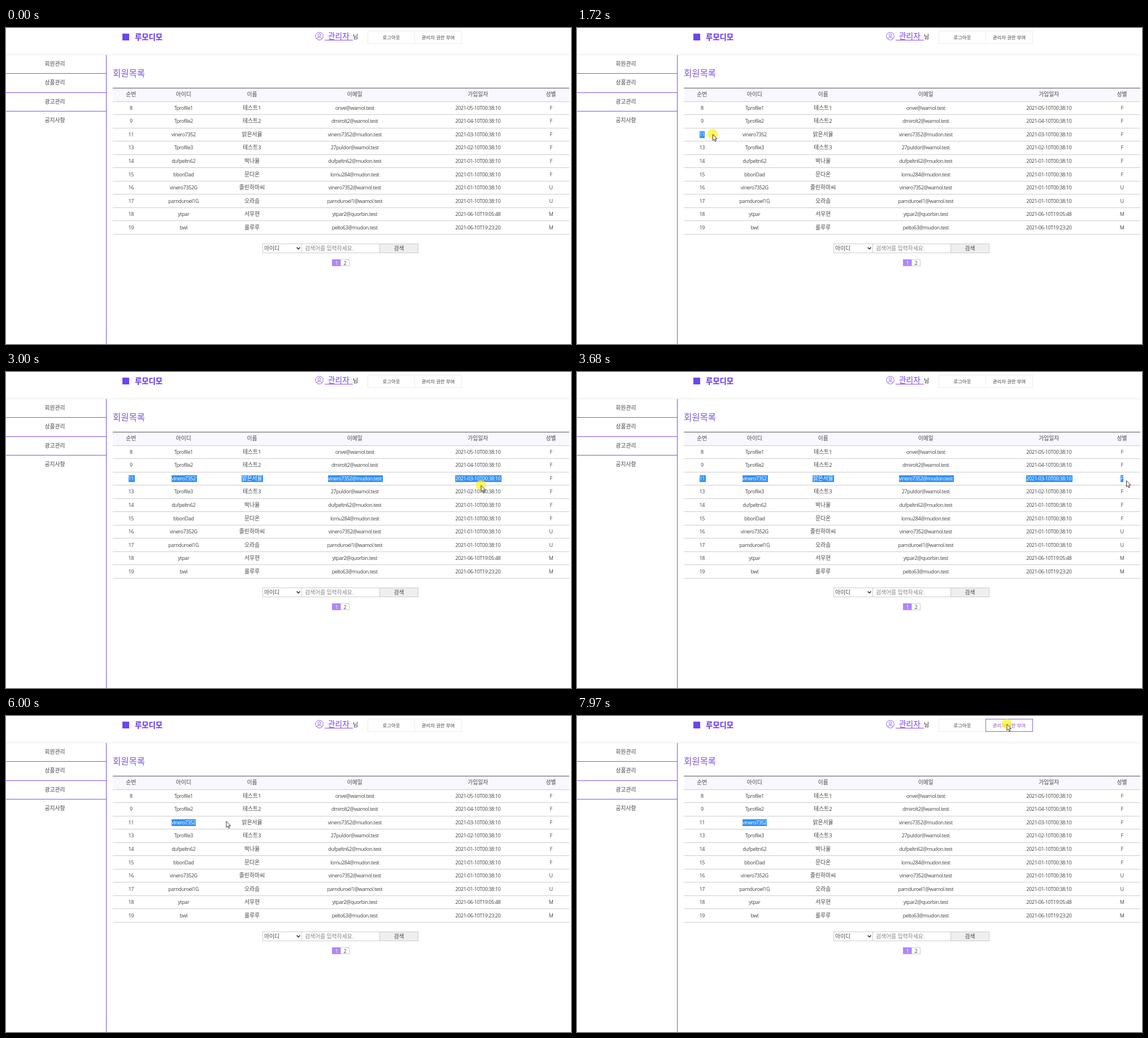
An HTML page for the animation above (8 s loop, 1000x560 px).

```html
<!DOCTYPE html>
<html lang="ko">
<head>
<meta charset="utf-8">
<title>회원목록</title>
<style>
html, body { margin: 0; width: 100%; height: 100%; overflow: hidden; background: #fff; }
body { position: relative; color: #444; font: 9.8px/12px "Open Sans", "Noto Sans CJK KR", sans-serif; white-space: nowrap; }
body > * { position: absolute; box-sizing: border-box; }

/* header */
.bar { left: 0; top: 47px; width: 997px; height: 1px; background: #e9e9e9; }
.mark { left: 206px; top: 10px; width: 12px; height: 12px; background: #6a45f2; }
.brand { left: 228px; top: 7px; font-size: 13.3px; line-height: 18px; font-weight: 700; color: #6029ee; }
.user { left: 547px; top: 7px; }
.admin { left: 564px; top: 5px; width: 50px; height: 17px; padding-left: 6px; border-bottom: 1px solid #8a4bf0; font-size: 13.7px; line-height: 17px; color: #7a3cee; }
.nim { left: 614px; top: 10px; color: #222; }
.btn { top: 5px; width: 84px; height: 23px; border: 1px solid #ebebeb; font-size: 8.4px; line-height: 22px; text-align: center; }

/* side menu */
nav { left: 0; top: 48px; width: 178px; height: 512px; border-right: 1px solid #7452cf; padding-right: 3px; text-align: center; }
nav div { height: 33.3px; line-height: 32px; box-sizing: border-box; border-bottom: 1px solid #8c50f0; margin-right: -3px; padding-right: 4px; }
nav div:last-child { border: 0; }

/* table */
h1 { left: 189px; top: 69px; margin: 0; font-size: 15.5px; line-height: 22px; font-weight: 500; color: #8156d4; }
main { left: 189px; top: 106px; width: 808px; border-top: 1px solid #555; }
.row { display: grid; grid-template-columns: 8% 15% 15% 30% 24% 8%; height: 23.55px; box-sizing: border-box; border-bottom: 1px solid #ccc; }
.row > div { display: grid; place-items: center; }
.head { background: #f9f7ff; }
.row span { position: relative; display: block; }
.latin { font-size: 9px; letter-spacing: -.4px; }
.row i { position: absolute; left: 0; top: 0; padding-right: 2px; font-style: normal; color: #fff; background: #3291fb; opacity: 0; }

/* search and pages */
.box { top: 382px; height: 17px; border: 1px solid #ccc; line-height: 15px; }
.page { top: 410px; width: 16px; height: 12px; line-height: 11px; font-size: 9px; text-align: center; border: 1px solid #ccc; }
.page.on { background: #b186fb; border-color: #b186fb; color: #fff; }

/* pointer */
#pointer { left: 0; top: 0; width: 0; height: 0; }
#pointer svg { position: absolute; left: -12px; top: -12px; overflow: visible; }
#pointer, #pointer svg *, .row i, #grant { animation: 8s step-end infinite; }
#pointer { animation-name: move, show; }
#pointer .spot { animation-name: spot; }
#pointer .arrow { animation-name: arrow; }
#pointer .beam { animation-name: beam; }
#grant { animation-name: hover; }

@keyframes show { 0% { opacity: 0 } 3.5%, 100% { opacity: 1 } }
@keyframes move {
  0%, 3.5% { transform: translate(944px, 544px) }
  4.39% { transform: translate(944px, 544px); animation-timing-function: steps(4, start) }
  7.94% { transform: translate(480px, 310px); animation-timing-function: steps(6, start) }
  13.26% { transform: translate(224px, 187px) }
  14% { transform: translate(221px, 188px) }
  14.81% { transform: translate(219px, 189px) }
  15.625% { transform: translate(218px, 188px) }
  19.69% { transform: translate(218px, 188px); animation-timing-function: steps(3, start) }
  22.125% { transform: translate(240px, 188px); animation-timing-function: steps(9, start) }
  29.875% { transform: translate(428px, 195px); animation-timing-function: steps(3, start) }
  32.25% { transform: translate(553.5px, 197px); animation-timing-function: steps(4, start) }
  35.825% { transform: translate(760px, 205px); animation-timing-function: steps(5, start) }
  40.11% { transform: translate(961px, 194px); animation-timing-function: steps(3, start) }
  42.75% { transform: translate(972px, 192px) }
  46.875% { transform: translate(972px, 192px); animation-timing-function: steps(2, start) }
  48.625% { transform: translate(945px, 187px); animation-timing-function: steps(2, start) }
  50.25% { transform: translate(899px, 190px); animation-timing-function: steps(5, start) }
  54.69% { transform: translate(520px, 190px); animation-timing-function: steps(6, start) }
  59.875% { transform: translate(325px, 188px) }
  75% { transform: translate(389.5px, 186px) }
  75.875% { transform: translate(389.5px, 186px); animation-timing-function: steps(4, start) }
  79.25% { transform: translate(600px, 100px); animation-timing-function: steps(4, start) }
  82.625% { transform: translate(786px, 14px) }
  83.5% { transform: translate(786px, 14px); animation-timing-function: steps(4, start) }
  87.2% { transform: translate(778px, 29px); animation-timing-function: steps(7, start) }
  93.625% { transform: translate(774px, 20px); animation-timing-function: steps(4, start) }
  97.625% { transform: translate(758px, 15px); animation-timing-function: steps(2, start) }
  99.625%, 100% { transform: translate(760.5px, 14px) }
}
@keyframes spot {
  0%, 43.75%, 48.625%, 62.75%, 65% { opacity: 0 }
  19%, 47.75%, 61.625%, 63.875%, 97.625%, 100% { opacity: 1 }
}
@keyframes beam {
  0%, 14.81%, 25.57%, 51.14%, 53.8%, 57.28%, 75%, 100% { opacity: 0 }
  12.375%, 23.85%, 50.25%, 52.91%, 56.41%, 59% { opacity: 1 }
}
@keyframes arrow {
  0%, 14.81%, 25.57%, 51.14%, 53.8%, 57.28%, 75%, 100% { opacity: 1 }
  12.375%, 23.85%, 50.25%, 52.91%, 56.41%, 59% { opacity: 0 }
}
@keyframes hover {
  0% { border-color: #ebebeb; color: #444 }
  83.5%, 100% { border-color: #8f5ee0; color: #8450d8 }
}

/* text selection, one rule per column */
@keyframes pick0 { 0%, 47.75% { opacity: 0 } 20.5% { opacity: 1; padding-right: 0 } 22.125% { opacity: 1; padding-right: 2px } }
@keyframes pick1 { 0%, 47.75% { opacity: 0 } 24.7% { opacity: 1; padding-right: 0 } 25.57% { opacity: 1; padding-right: 2px } 63.875%, 100% { opacity: 1; padding-right: 0 } }
@keyframes pick2 { 0%, 47.75% { opacity: 0 } 29.875% { opacity: 1; padding-right: 0 } 32.25% { opacity: 1; padding-right: 2px } }
@keyframes pick3 { 0%, 47.75% { opacity: 0 } 32.25% { opacity: 1 } }
@keyframes pick4 { 0%, 47.75% { opacity: 0 } 33.24% { opacity: 1 } }
@keyframes pick5 { 0%, 36.69%, 47.75% { opacity: 0; padding-right: 0 } 33.24%, 39.25% { opacity: 1; padding-right: 0 } }
@keyframes below { 0%, 36.69% { opacity: 0 } 33.24% { opacity: 1 } }
</style>
</head>
<body>
<div class="bar"></div>
<div class="mark"></div>
<div class="brand">루모디모</div>
<svg class="user" width="15" height="15" fill="none" stroke="#9560f2">
  <circle cx="7.5" cy="7.5" r="6.8"/><circle cx="7.5" cy="5.6" r="2.3"/>
  <path d="M3.2 12.4C3.8 8 11.2 8 11.8 12.4"/>
</svg>
<div class="admin">관리자</div>
<div class="nim">님</div>
<div class="btn" style="left:640px">로그아웃</div>
<div class="btn" id="grant" style="left:723px">관리자 권한 부여</div>

<nav><div>회원관리</div><div>상품관리</div><div>광고관리</div><div>공지사항</div></nav>

<h1>회원목록</h1>
<main></main>

<div class="box" style="left:454px;width:70px;padding-left:2px">아이디
  <svg width="7" height="5" style="position:absolute;left:59px;top:5px" fill="none" stroke="#222" stroke-width="1.5"><path d="M.6 .8L3.5 3.7L6.4 .8"/></svg>
</div>
<div class="box" style="left:523px;width:139px;padding-left:5px;color:#858585">검색어를 입력하세요.</div>
<div class="box" style="left:661px;width:69px;background:#efefef;text-align:center">검색</div>
<div class="page on" style="left:577px">1</div>
<div class="page" style="left:592px">2</div>

<div id="pointer">
  <svg width="24" height="24">
    <g transform="translate(12 12)">
      <circle class="spot" r="9" fill="#fff21a" fill-opacity=".72"/>
      <path class="arrow" d="M.4 .5V11.4L2.9 9.1L4.6 13L6.4 12.2L4.7 8.4H8Z" fill="#fff" stroke="#222" stroke-width=".9"/>
      <path class="beam" d="M-2.5 -5.5H-.6L0 -5L.6 -5.5H2.5M0 -5V5M-2.5 5.5H-.6L0 5L.6 5.5H2.5" fill="none" stroke="#222" stroke-width="1.1"/>
    </g>
  </svg>
</div>

<script>
const head = ['순번', '아이디', '이름', '이메일', '가입일자', '성별'];
const late = '2021-01-10T00:38:10';
const members = [
  ['8', 'Tprofile1', '테스트1', 'onve@wamol.test', '2021-05-10T00:38:10', 'F'],
  ['9', 'Tprofile2', '테스트2', 'dmirolt2@wamol.test', '2021-04-10T00:38:10', 'F'],
  ['11', 'vinero7352', '맑은서율', 'vinero7352@mudon.test', '2021-03-10T00:38:10', 'F'],
  ['13', 'Tprofile3', '테스트3', '27puldor@wamol.test', '2021-02-10T00:38:10', 'F'],
  ['14', 'dufpeltn62', '박나율', 'dufpeltn62@mudon.test', late, 'F'],
  ['15', 'bboriDad', '문다온', 'lomu284@mudon.test', late, 'F'],
  ['16', 'vinero7352G', '졸린하마씨', 'vinero7352@wamol.test', late, 'U'],
  ['17', 'parnduroel1G', '오라솜', 'parnduroel1@wamol.test', late, 'U'],
  ['18', 'ytpar', '서무현', 'ytpar2@quorbin.test', '2021-06-10T19:05:48', 'M'],
  ['19', 'bwl', '룰루루', 'pelto63@mudon.test', '2021-06-10T19:23:20', 'M']
];

// Name of the selection animation for a cell, if it is ever selected.
function pick(row, col) {
  if (row === 2) return 'pick' + col;
  return row === 3 && col < 4 ? 'below' : '';
}

function cell(text, row, col) {
  const name = pick(row, col);
  const mark = name ? `<i style="animation-name:${name}">${text}</i>` : '';
  const kind = /[가-힣]/.test(text) ? '' : 'latin';
  return `<div><span class="${kind}">${text}${mark}</span></div>`;
}

function line(cells, row) {
  const kind = row < 0 ? 'row head' : 'row';
  return `<div class="${kind}">${cells.map((text, col) => cell(text, row, col)).join('')}</div>`;
}

document.querySelector('main').innerHTML = line(head, -1) + members.map(line).join('');
</script>
</body>
</html>
```
